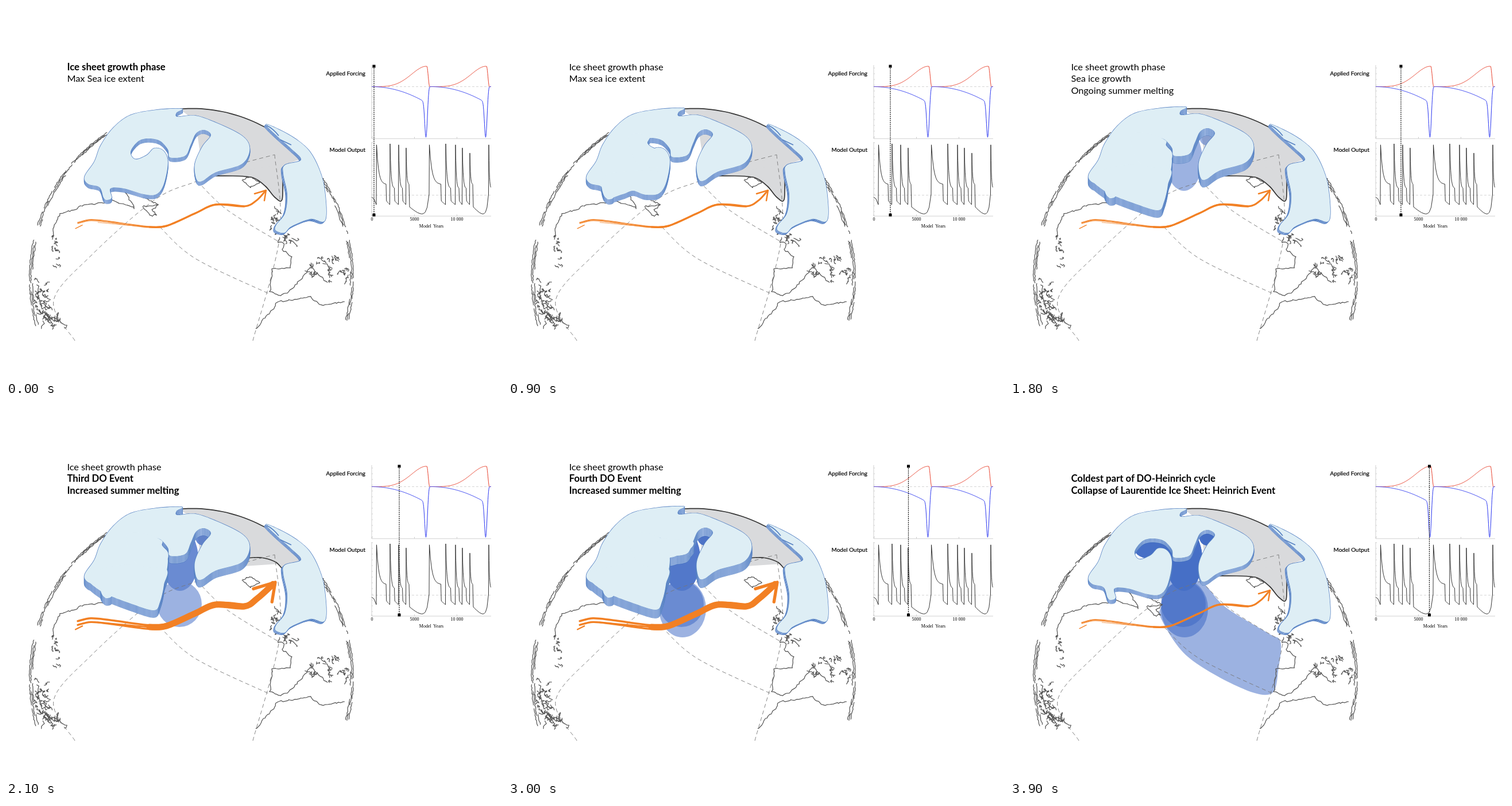
An HTML page for the animation above (4.2 s loop, 864x648 px).

```html
<!DOCTYPE html>
<html lang="en">
<head>
<meta charset="utf-8">
<title>Ice sheet cycle</title>
<style>
html, body { margin: 0; width: 100%; height: 100%; overflow: hidden; background: #fff; }
svg { display: block; width: 864px; height: 648px; }
text { white-space: pre; font-family: Lato, "Open Sans", sans-serif; }
.title { font-size: 16.2px; }
.title tspan { font-size: 16.7px; font-weight: 700; }
.label { font-size: 10px; text-anchor: end; stroke: #000; stroke-width: .2; }
.axis { font: 8px "Liberation Serif", serif; text-anchor: middle; }
path { fill: none; stroke-linejoin: round; }
.coast { stroke: #555; stroke-width: 1.25; }
.grid { stroke: #777; stroke-width: .9; stroke-dasharray: 7 5; }
.sea { fill: #d9dadc; }
.edge { stroke: #333; stroke-width: 1.7; }
.melt { fill: #3a66c4; fill-opacity: .5; }
.rim { stroke: #5580c2; stroke-width: 1.6; }
.side { fill: #a9c0e8; }
.top { fill: #deeef5; }
.flow { stroke: #f28024; stroke-linecap: round; }
</style>
</head>
<body>
<svg id="stage" viewBox="0 0 864 648"></svg>
<script>
const STEP = 300;
let seed = 11;
const rnd = () => (seed = (seed * 16807) % 2147483647) / 2147483647;
const parse = s => s.trim().split(/\s+/).map(p => p.split(',').map(Number));
const line = pts => 'M' + pts.map(p => p[0].toFixed(1) + ',' + p[1].toFixed(1)).join('L');
const path = (cls, d, more = '') => `<path class="${cls}" d="${d}" ${more}/>`;
const shift = (x, y, inner) => `<g transform="translate(${x} ${y})">${inner}</g>`;
const lerp = (a, b, t) => a + (b - a) * t;
const ellipse = (x, y, rx, ry) => `M${x - rx},${y}a${rx},${ry} 0 1 1 ${2 * rx},0a${rx},${ry} 0 1 1 ${-2 * rx},0Z`;

// Smooth curve through all points
function smooth(points, closed) {
  const p = typeof points === 'string' ? parse(points) : points, n = p.length;
  const at = i => closed ? p[(i + n) % n] : p[Math.max(0, Math.min(n - 1, i))];
  let d = 'M' + p[0];
  for (let i = 0; i < (closed ? n : n - 1); i++) {
    const [a, b, c, e] = [at(i - 1), at(i), at(i + 1), at(i + 2)];
    const ctl = (q, r, s, k) => [0, 1].map(j => (q[j] + k * (s[j] - r[j]) / 6).toFixed(1));
    d += `C${ctl(b, a, c, 1)} ${ctl(c, b, e, -1)} ${c}`;
  }
  return d + (closed ? 'Z' : '');
}

// Hand-drawn, jagged version of a polyline
function rough(pts, amp = 1.3) {
  const out = [];
  for (let i = 0; i + 1 < pts.length; i++) {
    const [a, b] = [pts[i], pts[i + 1]];
    const n = Math.ceil(Math.hypot(b[0] - a[0], b[1] - a[1]) / 3.5);
    for (let k = 0; k < n; k++) out.push([0, 1].map(j => lerp(a[j], b[j], k / n) + (rnd() - .5) * 2 * amp));
  }
  return line([...out, pts[pts.length - 1]]);
}

function scribble(cx, cy, rx, ry, count, size) {
  let d = '';
  while (count--) {
    const a = rnd() * 6.283, r = Math.sqrt(rnd()), pts = [];
    let x = cx + rx * r * Math.cos(a), y = cy + ry * r * Math.sin(a);
    for (let k = 0; k < 6; k++) {
      pts.push([x, Math.min(y, 563)]);
      x += (rnd() - .4) * size;
      y += (rnd() - .4) * size;
    }
    d += line(pts);
  }
  return d;
}

// Globe outline
const globe = { x: 323, y: 475, rx: 282, ry: 298 };
const halfWidth = y => globe.rx * Math.sqrt(1 - ((y - globe.y) / globe.ry) ** 2);
const topAt = x => globe.y - globe.ry * Math.sqrt(1 - ((x - globe.x) / globe.rx) ** 2);

function limb(side, y0, y1) {
  let d = '';
  for (let strand = 0; strand < 3; strand++) {
    for (let y = y0 + rnd() * 20; y < y1;) {
      const end = Math.min(y1, y + 25 + rnd() * 50), pts = [];
      for (; y <= end; y += 6) pts.push([globe.x + side * (halfWidth(y) - strand * 2.5), y]);
      if (pts.length > 1) d += rough(pts, .9);
      y += strand * 9;
    }
  }
  return d;
}

const land = path('coast', [
  '82,407 83,385 95,362 120,354 135,346 173,343',
  '185,338 224,352 206,322 238,333 266,346',
  '238,349 264,347 255,355 262,363 252,366 238,349',
  '411,303 425,297 441,307 425,316 411,303',
  '477,404 474,411 485,413 482,425 497,436 495,456 464,458 460,498 480,505 492,498 511,479 530,455 560,482',
  '436,563 449,545 466,527 470,516 530,507 549,521 590,515'
].map(s => rough(parse(s))).join('') +
  limb(-1, 205, 275) + limb(-1, 275, 385) + limb(-1, 400, 560) + limb(1, 293, 400) + limb(1, 408, 550) +
  scribble(60, 515, 14, 36, 30, 9) + scribble(82, 548, 17, 13, 16, 9) + scribble(84, 425, 6, 35, 14, 5) +
  scribble(468, 372, 9, 24, 11, 8) + scribble(492, 403, 13, 8, 8, 8) +
  scribble(545, 462, 26, 22, 14, 8) + scribble(565, 440, 25, 5, 9, 7) + scribble(585, 470, 10, 18, 7, 7));

// Ice: stacked copies of the outlines, drawn as rims first so that overlaps merge
const face = (cls, outlines) =>
  outlines.map(d => path('rim', d)).join('') + outlines.map(d => path(cls, d)).join('');
function slab(outlines, layers, dx, dy) {
  let s = '';
  for (let k = layers; k > 0; k--) s += shift(k * dx, k * dy, face('side', outlines));
  return s + face('top', outlines);
}

const laurentide = smooth(`306,179 262,181 217,190 187,212 165,243 154,271 137,297 143,310 163,316 170,334 176,338
 184,334 182,318 205,318 240,328 262,328 275,310 282,272 274,252 258,248 245,260 225,267 217,254 230,236 247,231
 268,235 282,250 286,264 312,261 322,241 331,222 345,216 357,225 342,245 329,275 332,302 342,305 365,290 408,277
 423,258 422,238 405,222 365,203 330,191 299,193 297,186`, true);
// Each stage of growth fills in more of the south coast and the bay
const growth = [[], [
  '165,300 170,335 200,329 218,323 240,330 265,325 262,290 200,290',
  '210,228 246,227 243,240 255,249 271,251 276,266 262,282 225,275'
], [
  '142,298 166,326 222,349 258,359 268,345 275,315 276,285 200,280',
  '212,228 245,226 271,237 272,246 282,258 280,272 262,285 225,275'
], ['262,236 290,236 322,240 316,254 284,268 264,262']];
const sheets = growth.map((_, i) => {
  const layers = Math.round(3 + i * 1.4);
  const added = growth.slice(0, i + 1).flat().map(s => smooth(s, true));
  return shift(0, 3 - layers, slab([laurentide, ...added], layers, 0, 2));
});

const europe = slab([smooth(`453,207 475,215 505,232 528,252 545,283 555,320 556,373 530,371 497,384 485,395 470,391
 471,381 486,361 490,328 483,292 486,277 514,268 496,248 478,232`, true)], 3, -.9, 1) +
  path('rim', 'M454,208Q466,214 475,226M478,233L497,242', 'stroke-width="2"');

// Sea ice: the southern edge moves between two extents
const least = parse('505,273 484,281 482,284 470,272 450,265 435,264 420,266 400,280');
const most = parse('493,274 483,290 481,337 468,333 452,314 430,299 395,296 350,296');
const north = [];
for (let x = 302; x <= 452; x += 15) north.push([x, topAt(x) + 1.5]);
function seaIce(extent) {
  const edge = least.map((p, i) => p.map((v, j) => lerp(v, most[i][j], extent)));
  return path('sea', line([...north, [480, 238], [513, 267], ...edge, [340, 270], [330, 200]]) + 'Z') +
    path('sea', smooth(edge)) + path('edge', smooth(edge)) + path('edge', smooth(north));
}

// Meltwater: each stage lays a wider pool over the earlier ones
const bay = ellipse(303, 267, 32, 55) + ellipse(250, 248, 34, 19) + ellipse(344, 229, 14, 14);
const plume = smooth('272,305 330,305 375,350 450,396 471,410 468,455 455,501 400,490 310,437 264,372 264,345', true);
const pools = ['', ellipse(302, 345, 39, 40), ellipse(304, 353, 41, 50), plume].map(d => path('melt', bay + d));

const grid = path('grid', [
  '120,583 83,513 150,433 260,337 333,305 403,277 468,259',
  '333,305 385,355 474,410',
  '268,385 330,440 460,502',
  '468,259 477,400 430,583'
].map(s => smooth(s)).join(''));

// Current: strands that merge into one brush stroke; strength 0 to 1
function current(strength) {
  const w = lerp(3, 11, strength), tip = [lerp(453, 469, strength), lerp(321, 307, strength)];
  const stroke = (d, width, y = 0) => shift(0, y, path('flow', d, `stroke-width="${width}"`));
  const mid = parse('250,385 280,383 330,361 365,346 415,349');
  const bend = [lerp(436, 438, strength), lerp(339, 335, strength)];
  const neck = tip.map((v, j) => lerp(v, bend[j], .12));
  const tail = parse('125,378 148,373 180,376 215,381');
  const head = parse('-20,6 0,0 -3,18').map(p => p.map((v, j) => tip[j] + v * (1 + strength * .9) * (j ? 1 : 1)));
  const full = smooth([...tail, ...mid]);
  return stroke(full, Math.max(1.6, w * .32), -w * .3) + stroke(full, Math.max(1.3, w * .3), w * .3) +
    stroke(smooth([[160, 377], ...mid]), w * .25) + stroke(smooth([...mid, bend, neck]), w) +
    stroke('M121,387L133,381', 1 + w * .12, w * .2) + stroke(line(head), 1.4 + w * .36);
}

// Charts
function forcing() {
  const red = [], blue = [];
  for (let x = 637; x <= 845; x += .5) {
    const u = (x - 637) % 104, drop = Math.min(1, Math.max(0, (u - 96) / 5));
    const keep = 1 - drop * drop * (3 - 2 * drop);
    const rise = Math.sin(Math.PI / 2 * Math.min(1, u / 95) ** 1.8) ** 2;
    red.push([x, 140.5 - 35.5 * rise * keep]);
    blue.push([x, 140.5 + 24 * Math.min(1, u / 88) ** 2 * keep + 64 * Math.exp(-(((u - 94.5) / 3) ** 2))]);
  }
  return path('', line(red), 'stroke="#e8402c"') + path('', line(blue), 'stroke="#2a36f0"');
}

// Each warming jumps up, decays, drops; a long gap ends in a cold bowl
function output() {
  const warmings = [645.5, 669, 684, 697, 737.5, 766, 783, 795, 808, 841];
  const pts = [[637, 333], [641, 336], [645, 346]];
  let rank = 0;
  warmings.forEach((x, i) => {
    const gap = (warmings[i + 1] || 850) - x, cold = gap > 30;
    const peak = 240 + 1.8 * (rank - 1) ** 2, level = gap > 20 ? 311 : 318;
    const span = cold ? 5 : gap * (gap > 20 ? .7 : .5);
    for (let t = 0; t <= 1; t += .1) pts.push([x + span * t, level - (level - peak) * Math.exp(-4.5 * t)]);
    pts.push([x + span + .7, 338]);
    for (let t = 0; t <= 1; t += .1) {
      const y = cold ? 350 + 13 * Math.sin(Math.PI / 2 * Math.min(1, t / .75)) - 35 * t ** 10 : 340 + 6 * t;
      pts.push([lerp(x + span + 1, x + gap - .5, t), y]);
    }
    rank = cold ? 0 : rank + 1;
  });
  return path('', line(pts.filter(p => p[0] < 845)), 'stroke="#222" stroke-width=".9"');
}

const charts = (() => {
  let ticks = '';
  for (let y = 108; y < 364; y += 10) ticks += `M637,${y}h2`;
  for (let x = 637.5; x < 845; x += 74) ticks += `M${x},366v-3M${x},231v-3`;
  const text = (cls, x, y, s) => `<text class="${cls}" x="${x}" y="${y}">${s}</text>`;
  return path('', 'M637,103V231H845M637,237V366H845' + ticks, 'stroke="#c4c4c4" stroke-width=".8"') +
    path('', 'M637,140.5H845M637,329.5H845', 'stroke="#ccc" stroke-width=".8" stroke-dasharray="4 3"') +
    forcing() + output() +
    text('label', 626, 120.5, 'Applied Forcing') + text('label', 626, 254, 'Model Output') +
    ['0', '5000', '10 000'].map((s, i) => text('axis', 637.5 + 74 * i, 374, s)).join('') +
    text('axis', 741, 385.5, 'Model  Years');
})();

const cursor = x => path('', `M${x},105V364`, 'stroke="#000" stroke-width="1.2" stroke-dasharray="2 1.6"') +
  path('', `M${x - 2.5},102.5h5v5h-5zM${x - 2.5},361.5h5v5h-5z`, 'style="fill:#000"');

const title = lines => lines.map((s, i) =>
  `<text class="title" x="106.5" y="${112 + i * 20.3}">${s.replace(/\*(.+?)\*/g, '<tspan>$1</tspan>')}</text>`).join('');

const years = [641, 647, 658, 666, 671, 676, 681, 685, 689, 693.5, 697.5, 699.5, 708.5, 730.5];
const weakening = '*Weakening of AMOC,* sea ice growth', growing = 'Sea ice growth', widest = 'Max sea ice extent';
const states = [
  'Max Sea ice extent', '*First DO Event*', weakening, widest, '*Second DO Event*', weakening, growing,
  '*Third DO Event*', growing, widest, '*Fourth DO Event*', growing, widest
];
const collapse = ['', '*Coldest part of DO-Heinrich cycle*', '*Collapse of Laurentide Ice Sheet: Heinrich Event*'];

// Sea ice retreats at each warming, then regrows over two steps
function scene(i) {
  const last = i === years.length - 1, phase = last ? 2 : (i + 2) % 3;
  const sheet = last ? 0 : Math.min(3, Math.floor(i / 3)), melt = Math.max(0, Math.floor((i - 1) / 3));
  const words = last ? collapse : [
    i ? 'Ice sheet growth phase' : '*Ice sheet growth phase*', states[i],
    !melt ? '' : phase ? 'Ongoing summer melting' : '*Increased summer melting*'
  ];
  return seaIce([0, .7, 1][phase]) + pools.slice(0, melt).join('') + land + grid + current([1, .35, 0][phase]) +
    sheets[sheet] + europe + charts + cursor(years[i]) + title(words);
}

const stage = document.getElementById('stage');
let shown = -1;
function draw() {
  const i = Math.floor(performance.now() / STEP) % years.length;
  if (i !== shown) stage.innerHTML = scene(shown = i);
  requestAnimationFrame(draw);
}
draw();
</script>
</body>
</html>
```
